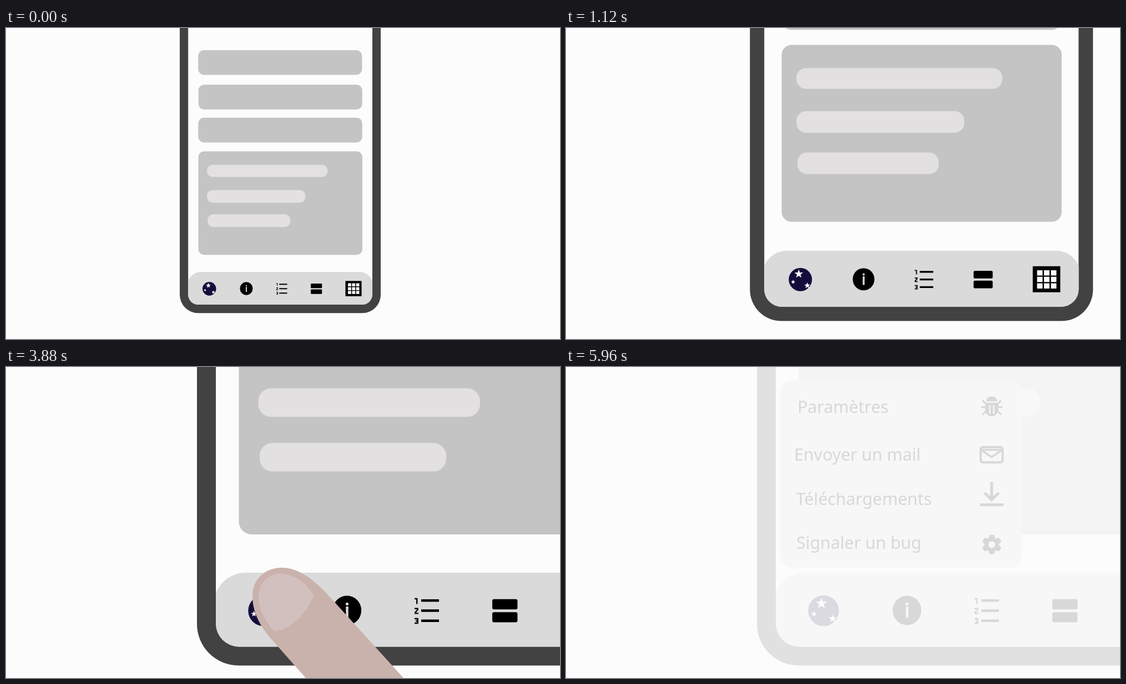
Write an HTML page that moves like this. It is 998 by 561 pixels and loops after 6000 ms.

```html
<!DOCTYPE html>
<html lang="fr">
<head>
<meta charset="utf-8">
<title>Menu</title>
<style>
html, body { margin: 0; width: 100%; height: 100%; overflow: hidden; background: #fcfcfc; }
svg { display: block; width: 100vw; height: 100vh; }
text { font: 30.3px "Noto Sans", "Open Sans", sans-serif; }
.line { fill: none; stroke: #000; }
</style>
</head>
<body>
<svg id="stage" viewBox="0 0 998 561">
  <defs>
    <clipPath id="screenClip"><rect x="378" y="-1000" width="748" height="1504.5" rx="42"/></clipPath>
    <clipPath id="menuClip"><path id="menuShape"/></clipPath>
  </defs>

  <g id="phone">
    <rect x="344" y="-1000" width="816" height="1538.5" rx="75" fill="#424242"/>
    <g clip-path="url(#screenClip)">
      <rect x="378" y="-1000" width="748" height="1510" fill="#fcfcfc"/>
      <g fill="#c4c4c4">
        <rect x="419" y="-530" width="665" height="100" rx="23"/>
        <rect x="420" y="-390" width="665" height="101" rx="23"/>
        <rect x="419" y="-256" width="666" height="101" rx="23"/>
        <rect x="419.5" y="-119" width="666" height="421" rx="23"/>
      </g>
      <g fill="#e2e0e0">
        <rect x="454.5" y="-64" width="490" height="49.5" rx="23"/>
        <rect x="454.5" y="38.5" width="399.5" height="51.5" rx="23"/>
        <rect x="457" y="137" width="336" height="51.5" rx="23"/>
      </g>
      <rect x="374" y="371" width="756" height="200" rx="58" fill="#dadada"/>
    </g>

    <g id="globe">
      <circle r="27.7" fill="#140d3c"/>
      <path id="stars" fill="#fff"/>
    </g>

    <ellipse cx="614.3" cy="439" rx="25.8" ry="26.5"/>
    <g fill="#dadada">
      <circle cx="614.5" cy="427.5" r="2.6"/>
      <rect x="612.3" y="432" width="4.4" height="20.5"/>
    </g>

    <path class="line" stroke-width="4.4" d="M748 421.3h32M748 439.5h32M748 457.7h32"/>
    <path class="line" stroke-width="2.4" d="M736 418h4.2v9.5M736 435.8h5.6v2l-4.4 5v1.6h5.8M736 454h5.6v8h-5.6M738 458h3.6"/>

    <rect x="876" y="418.8" width="45.4" height="18.4" rx="3"/>
    <rect x="876" y="442.2" width="45.4" height="18.4" rx="3"/>

    <rect x="1016.7" y="408" width="65.5" height="62"/>
    <path id="cells" fill="#fcfcfc"/>
  </g>

  <path id="beam" d="M466 476L441 361H488.500Z" fill="#bed2ff"/>

  <g id="menu" clip-path="url(#menuClip)">
    <rect x="386" y="24" width="435" height="338.500" fill="#dadada"/>
    <text x="417" y="83">Paramètres</text>
    <text x="411" y="169">Envoyer un mail</text>
    <text x="414.500" y="249">Téléchargements</text>
    <text x="415" y="328">Signaler un bug</text>

    <path d="M757 62a10 9 0 0 1 20 0zM755 64.500h24v12a12 12.500 0 0 1-24 0z"/>
    <path class="line" stroke-width="3" d="M750 60l6 6M784 60l-6 6M748 72.500h8M786 72.500h-8M750 86l6-6M784 86l-6-6"/>
    <path class="line" stroke-width="2.500" style="stroke:#dadada" d="M763.500 69v15M770.500 69v15"/>

    <rect class="line" stroke-width="4" x="747" y="144.500" width="39.500" height="27.500" rx="4"/>
    <path class="line" stroke-width="3.500" d="M748 149.500h38M750 151l16.800 11.500l16.800-11.500"/>

    <path class="line" stroke-width="5" d="M766.800 207v32M754 227l12.800 12.500l12.800-12.500M746 248.500h42"/>

    <g transform="translate(767 320.300)">
      <circle class="line" r="9.600" stroke-width="6.800"/>
      <path id="teeth"/>
    </g>
  </g>

  <g id="finger">
    <path fill="#cab2ac" d="M444 414C444 383 466 362 497 362C535 362 568 397 590 422L716 561L1100 984V1100H592V759C592 722 622 695 656 701Q665 702 673 706L540 561L480 493C462 473 444 446 444 414Z"/>
    <path fill="#d2c0bf" d="M455 415C455 391 472 373 494 373C520 373 541 390 554 411C548 433 521 470 488 476Q483 477 479 472C466 456 455 437 455 415Z"/>
  </g>
</svg>

<script>
const $ = id => document.getElementById(id);
const ramp = (t, a, b) => Math.min(1, Math.max(0, (t - a) / (b - a)));
const mix = (a, b, p) => a + (b - a) * p;
const smooth = p => p * p * (3 - 2 * p);

function star(x, y, r) {
  let d = '';
  for (let i = 0; i < 10; i++) {
    const a = i * Math.PI / 5, q = i % 2 ? r * 0.4 : r;
    d += `${i ? 'L' : 'M'}${x + q * Math.sin(a)} ${y - q * Math.cos(a)}`;
  }
  return d + 'Z';
}

function tooth(i) {
  const a = i * Math.PI / 3, c = Math.cos(a), s = Math.sin(a);
  return [[-6, -10], [-4, -17.5], [4, -17.5], [6, -10]]
    .map(([x, y], k) => `${k ? 'L' : 'M'}${x * c - y * s} ${x * s + y * c}`).join('') + 'Z';
}

$('stars').setAttribute('d', star(-3.8, -13.2, 10.8) + star(-17.3, 5.7, 5.6) + star(16.5, 14.3, 7.8));
$('teeth').setAttribute('d', [0, 1, 2, 3, 4, 5].map(tooth).join(''));
$('cells').setAttribute('d', [...Array(9).keys()]
  .map(i => `M${1027 + i % 3 * 16.5} ${417.5 + Math.floor(i / 3) * 15.5}h13v12.500h-13z`).join(''));

function drawPhone(t) {
  const p = Math.pow(ramp(t, 0, 1440), 2.28);
  const q = p + 0.2 * p * p * (1 - p);
  const s = mix(0.4437, 1, p);
  const x = mix(313, 344, q) - 344 * s, y = mix(514.2, 538.5, q) - 538.5 * s;
  $('phone').setAttribute('transform', `translate(${x} ${y}) scale(${s})`);
}

function drawMenu(t) {
  const open = ramp(t, 4520, 4870), leave = ramp(t, 4960, 5160);
  const grow = 1 + 0.37 * (smooth(ramp(t, 4040, 4360)) - leave);
  $('globe').setAttribute('transform', `translate(464 439.700) scale(${grow})`);
  $('beam').setAttribute('opacity', 0.4 * (ramp(t, 4520, 4600) - leave));

  const top = mix(362.5, 24, open), r = mix(3, 25, open);
  $('menu').style.display = open ? '' : 'none';
  $('menuShape').setAttribute('d',
    `M386 ${top + r}q0 ${-r} ${r} ${-r}H${821 - r}q${r} 0 ${r} ${r}V338.500q0 24-24 24H410q-24 0-24-24Z`);
}

function drawFinger(t) {
  const swipe = smooth(ramp(t, 4040, 4360));
  const press = t < 3880 ? 4 : t < 3920 ? 0 : -1;
  const arrive = 215 * (1 - ramp(t, 2640, 2920));
  const exit = 400 * ramp(t, 4800, 5160);
  const y = mix(press + arrive, -164.8, swipe) + exit;
  $('finger').style.display = t < 2680 || t >= 5160 ? 'none' : '';
  $('finger').setAttribute('transform', `translate(${0.6 * swipe} ${y}) scale(${mix(1, 0.935, swipe)})`);
}

function frame(now) {
  const t = Math.floor(now % 6000 / 40) * 40;
  drawPhone(t);
  drawMenu(t);
  drawFinger(t);
  $('stage').style.opacity = 1 - ramp(t, 5680, 6005);
  requestAnimationFrame(frame);
}

const start = performance.now();
const tick = () => frame(Math.max(0, performance.now() - start));
window.requestAnimationFrame = (raf => () => raf(tick))(window.requestAnimationFrame.bind(window));
tick();
</script>
</body>
</html>
```
